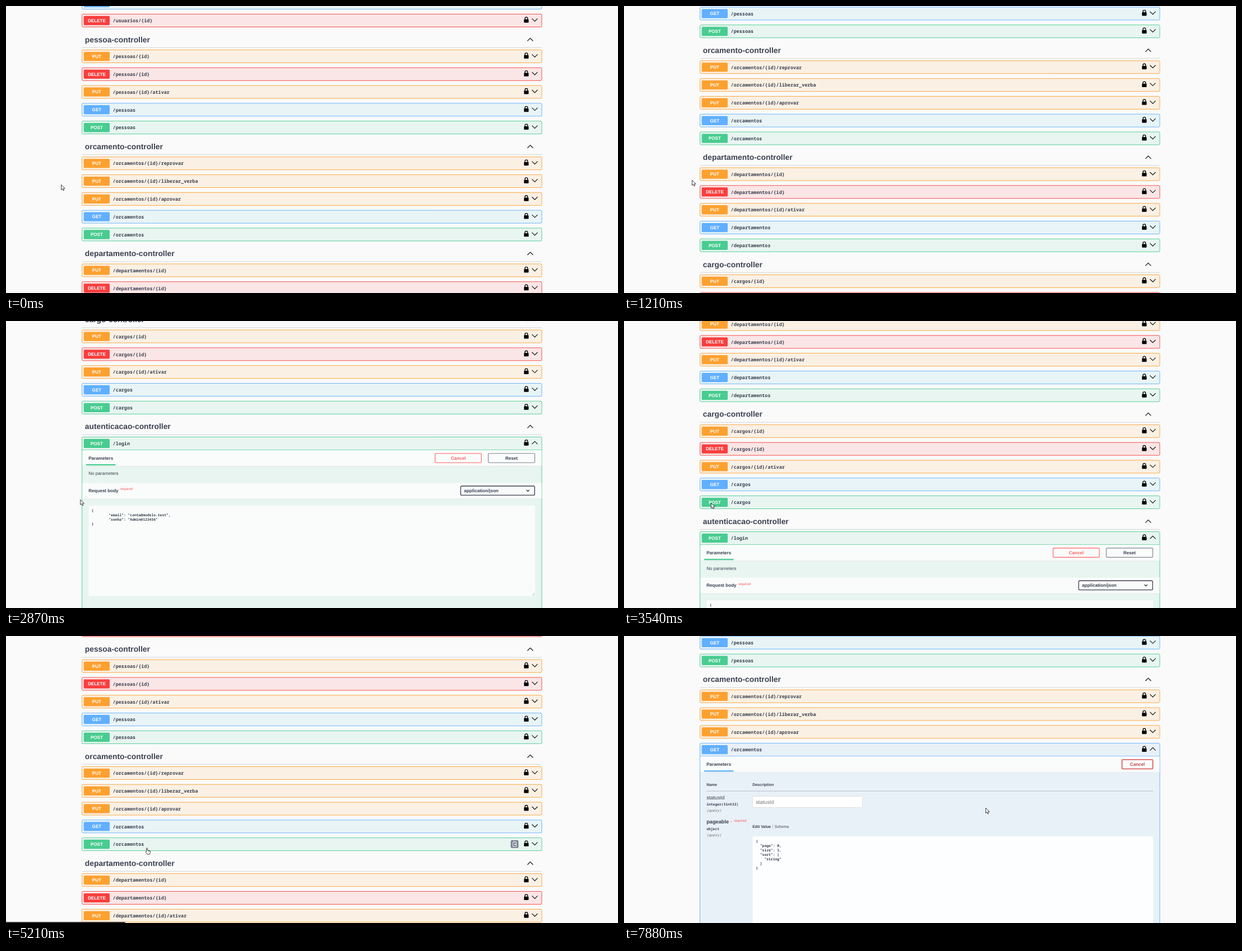
An HTML page for the animation above (8 s loop, 1092 by 513 pixels).

```html
<!DOCTYPE html>
<html lang="pt">
<head>
<meta charset="utf-8">
<title>API</title>
<style>
html, body { margin: 0; width: 100%; height: 100%; overflow: hidden; background: #fafafa; }
svg { display: block; width: 1092px; height: 513px; }
text { font-family: "Liberation Sans", Arial, sans-serif; font-size: 8.08px; fill: #3b4151; text-rendering: geometricPrecision; }
.b { font-weight: 700; }
.m { font-family: "Noto Sans Mono", "DejaVu Sans Mono", monospace; font-weight: 600; font-size: 6.35px; }
.path { font-size: 8.45px; font-weight: 700; }
.tag { font-size: 13.84px; font-weight: 700; }
.verb { font-weight: 700; fill: #fff; text-anchor: middle; }
.mid { text-anchor: middle; }
.s { font-size: 6.92px; }
.l { font-size: 9.23px; }
.req { font-size: 6.1px; fill: #f55; }
.i { font-style: italic; font-weight: 400; fill: #666; }
.line { fill: none; stroke: #111; stroke-width: 1.15; }
</style>
</head>
<body>
<svg id="stage" viewBox="0 0 1092 513"></svg>
<script>
const VERBS = {
  PUT: ['#fca130', '#faf0e4'],
  DELETE: ['#f93e3e', '#fae6e6'],
  GET: ['#61affe', '#e8f4f6'],
  POST: ['#49cc90', '#e8f5f1']
};
const OPEN_BLUE = '#e9f1f8', OPEN_GREEN = '#e8f5f0';
const PITCH = 31.8, GROUP = 191.25;
const crud = n => [['PUT', `/${n}/{id}`], ['DELETE', `/${n}/{id}`], ['PUT', `/${n}/{id}/ativar`], ['GET', `/${n}`], ['POST', `/${n}`]];
const GROUPS = [
  ['pessoa', crud('pessoas')],
  ['orcamento', [['PUT', '/orcamentos/{id}/reprovar'], ['PUT', '/orcamentos/{id}/liberar_verba'],
    ['PUT', '/orcamentos/{id}/aprovar'], ['GET', '/orcamentos'], ['POST', '/orcamentos']]],
  ['departamento', crud('departamentos')],
  ['cargo', crud('cargos')],
  ['autenticacao', []]
];
const rowY = (g, i) => 89.9 + g * GROUP + i * PITCH;
const centers = [];

const text = (x, y, s, cls = '', extra = '') => `<text x="${x}" y="${y}" class="${cls}" ${extra}>${s}</text>`;
const rect = (x, y, w, h, fill, extra = '') => `<rect x="${x}" y="${y}" width="${w}" height="${h}" fill="${fill}" ${extra}/>`;
const hline = (y, color, x = 135.5, x2 = 956, w = .7) => `<path d="M${x} ${y}H${x2}" stroke="${color}" stroke-width="${w}"/>`;
const chevron = (x, y, up, r = 5) => {
  const d = up ? r / 2 : -r / 2;
  return `<path class="line" d="M${x - r} ${y + d}L${x} ${y - d}L${x + r} ${y + d}"/>`;
};
const lock = y => rect(924.3, y - 2.2, 8.2, 6.2, '#000', 'rx=".9"') +
  `<path d="M926 ${y - 1.5}v-2a2.4 2.5 0 0 1 4.8 0v2" fill="none" stroke="#000" stroke-width="1.3"/>`;
const button = (x, w, y, label, color, ink, sw = 1.15) =>
  rect(x, y, w, 16.5, 'none', `stroke="${color}" stroke-width="${sw}" rx="1.5"`) +
  text(x + w / 2, y + 11.1, label, 'b mid', `style="fill:${ink}"`);

function row(verb, path, y, open, fill) {
  const [color, bg] = VERBS[verb];
  return rect(135.6, y - 11.4, 820.4, open ? 620 : 23, fill || bg, `stroke="${color}" stroke-width=".9" rx="2"`) +
    rect(138.7, y - 8, 46.3, 16.3, color, 'rx="1.7"') +
    text(161.9, y + 2.9, verb, 'verb') + text(190.6, y + 3.3, path, 'm path') +
    lock(y) + chevron(943.5, y - 1, open);
}

function panelHead(y, color) {
  return rect(136.1, y + 11.7, 819.4, 29, '#fafcfc') + hline(y + 11.6, color) +
    hline(y + 41, '#dde3e3', 136.1, 955.5) +
    text(147.2, y + 28.9, 'Parameters', 'b') + rect(143, y + 37.2, 52.5, 2.3, color);
}

function code(x, y, lines, style = '') {
  return lines.map((s, i) => {
    const body = s.trimStart();
    return text(x + (s.length - body.length) * 3.81, y + i * 8, body, 'm', style);
  }).join('');
}

function login(y) {
  const area = y + 111.2;
  return row('POST', '/login', y, true, OPEN_GREEN) + panelHead(y, '#49cc90') +
    button(765.7, 82.5, y + 18, 'Cancel', '#ff6060', '#ff6060') +
    button(860.5, 83, y + 18, 'Reset', '#80848c', '#3b4151') +
    text(147.2, y + 56.6, 'No parameters') +
    rect(136.1, y + 70.8, 819.4, 28.5, '#fafcfc') + hline(y + 99.4, '#dde3e3', 136.1, 955.5) +
    text(147.2, y + 87.2, 'Request body', 'b') + text(203.8, y + 83.8, 'required', 'req') +
    rect(811.3, y + 76.3, 132, 16.4, '#f9fafa', 'stroke="#3b4151" stroke-width="1.3" rx="2"') +
    text(817.3, y + 87.3, 'application/json', 'b') + chevron(931.2, y + 84.5, false, 2.6) +
    rect(147.4, area, 796.6, 161.5, '#fafcfb', 'rx="2"') +
    `<path d="M939 ${area + 160.5}l4 -4M941.3 ${area + 160.5}l1.7 -1.7" stroke="#777" stroke-width=".6"/>` +
    code(152.8, area + 11.3, ['{', '        "email": "conta@modelo.test",', '        "senha": "Admin@123456"', '}']);
}

const JSON_LINES = ['{', '  "page": 0,', '  "size": 1,', '  "sort": [', '    "string"', '  ]', '}'];

function budgets(y) {
  const cell = (dy, s, cls) => text(147.2, y + dy, s, cls);
  return rect(134, y - 12, 824, 640, '#fafafa') +
    row('GET', '/orcamentos', y, true, OPEN_BLUE) + panelHead(y, '#61affe') +
    cell(65.3, 'Name', 'b s') + text(229.2, y + 65.3, 'Description', 'b s') +
    hline(y + 74.1, '#9aa3b2', 147.4, 944) +
    cell(88.6, 'statusId', 'l') + cell(100.2, 'integer($int32)', 'm') + cell(111, '(query)', 'm i') +
    rect(229.5, y + 83.4, 196, 20, '#fff', 'stroke="#d5d9dd" stroke-width=".7" rx="2"') +
    text(235.2, y + 96.6, 'statusId', 'l', 'style="fill:#757575"') +
    cell(132.4, 'pageable', 'b l') + text(190, y + 132, '*', 'l req') + text(196.2, y + 129.1, 'required', 'req') +
    cell(144, 'object', 'm') + cell(155.1, '(query)', 'm i') +
    `<g id="idle">` + button(880.5, 63, y + 17.9, 'Try it out', '#7b808a', '#3b4151') +
    text(229.2, y + 140.1, 'Example Value', 'b s') + rect(281.3, y + 133.8, .6, 7, '#999') +
    text(284.8, y + 140.1, 'Schema', 's') +
    rect(229.4, y + 154.9, 714.6, 67, '#333', 'rx="2.3"') +
    code(235.2, y + 165.6, JSON_LINES, 'style="fill:#fff"') + `</g>` +
    `<g id="edit">` + button(888.6, 55, y + 17.9, 'Cancel', '#d94f4f', '#c04444', 1.6) +
    text(229.2, y + 140.1, 'Edit Value', 'b s') + rect(265.2, y + 133.8, .6, 7, '#999') +
    text(268.8, y + 140.1, 'Schema', 's') +
    rect(229.4, y + 154.9, 714.6, 240, '#fdfeff', 'rx="2"') +
    code(235.2, y + 165.6, JSON_LINES) + `</g>`;
}

let doc = row('GET', '/usuarios', rowY(-1, 3)) + row('DELETE', '/usuarios/{id}', rowY(-1, 4));
GROUPS.forEach(([name, rows], g) => {
  const top = 60 + g * GROUP;
  doc += text(140.8, top + 4.7, name + '-controller', 'tag') + chevron(935.4, top, true) + hline(top + 14.4, '#c2c6cb');
  rows.forEach(([verb, path], i) => {
    centers.push(rowY(g, i));
    doc += row(verb, path, rowY(g, i));
  });
});
doc += login(rowY(4, 0)) + `<g id="panel">${budgets(rowY(1, 3))}</g>`;
doc += `<g id="copy">` + rect(0, -7, 13.8, 14, '#7d8293', 'rx="2"') +
  `<path d="M3.8 -3.8h6.2v8.2h-6.2zM5.4 -4.4h3M10 .5h-3.6m1.5 -1.5l-1.5 1.5l1.5 1.5" fill="none" stroke="#fff" stroke-width=".9"/></g>`;

const $ = id => document.getElementById(id);
$('stage').innerHTML = rect(0, 0, 1092, 513, '#fafafa') + `<g id="doc">${doc}</g>` +
  rect(0, 511.2, 212.5, 2, '#202124', 'id="status"') +
  `<g id="pointer" stroke="#111" stroke-width=".8" stroke-linejoin="round" fill="#fff">
  <path id="arrow" d="M.5 .5V9.6L2.6 7.7L4.1 11L5.6 10.3L4.2 7.1H7.2Z"/>
  <path id="hand" d="M-.9 6.3V.6a.9 .9 0 0 1 1.8 0V4l4 .8q1.2 .3 1.1 1.6l-.5 2.9l-.8 1.9H.5L-2.2 7.4q-.4 -1.3 1.3 -1.1ZM2.3 4.4v1.6M4.1 4.8v1.4"/></g>`;

// [first, last, count] of each run of redraws
const RUNS = [[0, 0, 1], [120, 1060, 8], [1210, 2180, 8], [2300, 2570, 3], [2870, 2870, 1], [3150, 4090, 8],
  [4240, 5210, 8], [5340, 6290, 8], [6440, 7450, 8], [7580, 7580, 1], [7880, 7880, 1]];
const ticks = RUNS.flatMap(([a, b, n]) =>
  Array.from({ length: n }, (_, i) => n > 1 ? Math.floor((a + (b - a) * i / (n - 1)) / 10) * 10 : a));

const SCROLL = [[0, 0], [380, 0], [1210, 171.9], [1900, 351.5], [2570, 636.2], [3010, 636.2], [4240, 115.8],
  [4640, 115.8], [5470, 0], [6580, 0], [7010, 173.5]];
const POINTER = [[0, 98, 319], [120, 97, 319], [1210, 121, 311], [1900, 125, 322], [2570, 132.6, 319], [2870, 132.2, 319],
  [3150, 132.2, 319], [4240, 228, 344], [4800, 251.5, 379], [6860, 251.5, 379], [7450, 919, 195],
  [7580, 917, 235], [7880, 645, 307]];

function at(track, t) {
  const i = track.findIndex(k => k[0] > t);
  if (i < 0) return track[track.length - 1].slice(1);
  const a = track[i - 1], b = track[i], u = (t - a[0]) / (b[0] - a[0]);
  return a.slice(1).map((v, j) => v + (b[j + 1] - v) * u);
}
const show = (id, on) => $(id).setAttribute('display', on ? 'inline' : 'none');
const move = (id, x, y, more = '') => $(id).setAttribute('transform', `translate(${x} ${y})${more}`);

function draw(now) {
  const time = now % 8000;
  const t = ticks.filter(k => k <= time).pop();
  const [scroll] = at(SCROLL, t), [x, y] = at(POINTER, t);
  const overLink = t >= 4370 && t < 6700;
  const hot = t >= 4240 && t < 6700 ? centers.find(c => Math.abs(c - scroll - y) < 13.5) : undefined;
  const hand = overLink || t === 7580;
  move('doc', 0, -scroll);
  move('pointer', x, y);
  show('hand', hand);
  show('arrow', !hand);
  show('status', overLink);
  show('panel', t >= 5740);
  show('idle', t < 7880);
  show('edit', t >= 7880);
  show('copy', hot !== undefined);
  if (hot !== undefined) t < 4370 ? move('copy', 907.2, hot, ' scale(.58 1)') : move('copy', 900.6, hot);
}

const start = performance.now();
function loop() {
  draw(performance.now() - start);
  requestAnimationFrame(loop);
}
loop();
</script>
</body>
</html>
```
